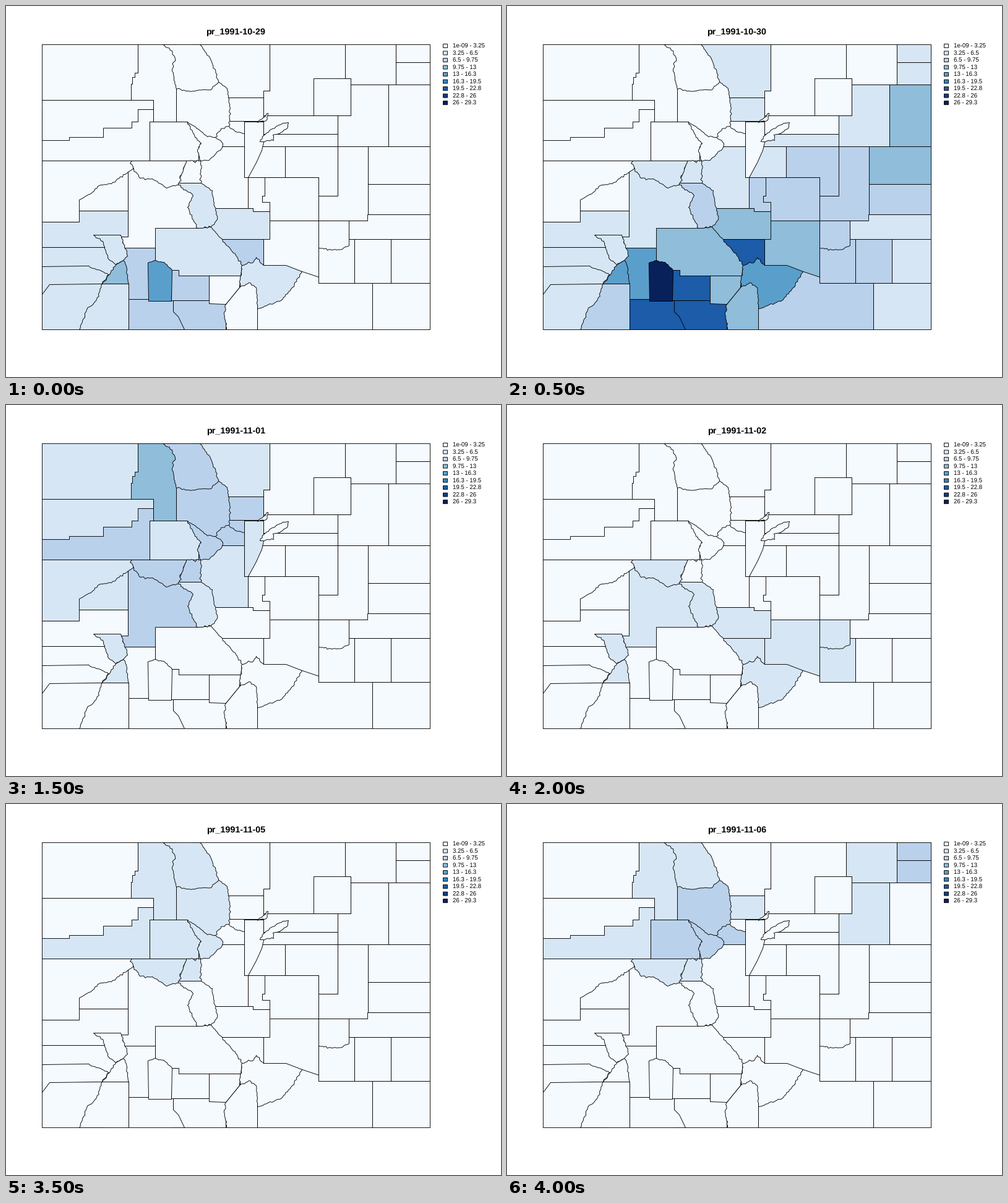
These frames come from a looping animation (800 px wide and 600 px high, 4.5 s). A matplotlib script:

```python
import numpy as np
import matplotlib.pyplot as plt
from matplotlib.animation import FuncAnimation
from matplotlib.collections import PolyCollection
from matplotlib.patches import Rectangle

W, H, DPI = 800, 600, 100
PX = 72 / DPI
LINE = 0.9 * PX
SHADES = ["#f5fafe", "#d6e6f4", "#bad1eb", "#8fbdda", "#5a9fcc",
          "#3585bf", "#1c5ca8", "#083f87", "#08215a"]
STEP = 3.25

rng = np.random.default_rng(11)
counties = {}  # painted in this order; later ones cover the hidden edges


def rough(pts):
    """Natural border: a line through pts with a small sideways wobble."""
    line = [pts[0]]
    for (x0, y0), (x1, y1) in zip(pts, pts[1:]):
        size = np.hypot(x1 - x0, y1 - y0)
        n = max(1, round(size / 3))
        for k in range(1, n):
            t, d = k / n, rng.normal(0, 0.8) / size
            line.append((x0 + (x1 - x0) * t - (y1 - y0) * d,
                         y0 + (y1 - y0) * t + (x1 - x0) * d))
        line.append((x1, y1))
    return line


def county(name, *parts):
    """Tuples are straight corners, lists are natural borders."""
    pts = []
    for part in parts:
        pts += rough(part) if isinstance(part, list) else [part]
    counties[name] = np.array(pts, float) + 0.5


def block(name, *corners):
    """Survey lines: go across, then down (or up), to each corner in turn."""
    pts = [corners[0]]
    for x, y in corners[1:] + corners[:1]:
        pts += [(x, pts[-1][1]), (x, y)]
    county(name, *pts)


# Plains
block("weld", (426, 62), (548, 177), (416, 137))
block("morgan", (497, 117), (557, 177))
block("logan", (548, 62), (630, 127), (557, 117))
block("sedgwick", (630, 62), (685, 91))
block("phillips", (630, 91), (685, 127))
block("washington", (557, 127), (618, 227), (536, 177))
block("yuma", (618, 127), (685, 227))
block("adams", (416, 177), (536, 207))
block("arapahoe", (414, 207), (536, 227))
block("douglas", (391, 227), (451, 277))
block("elbert", (451, 227), (536, 307), (505, 277))
block("lincoln", (536, 227), (585, 347), (505, 307))
block("kit_carson", (585, 227), (685, 288))
block("cheyenne", (585, 288), (685, 337))
block("kiowa", (584, 337), (685, 377), (554, 347))
block("el_paso", (414, 277), (505, 347))
block("teller", (391, 277), (418, 307), (414, 317), (426, 332), (399, 327))
block("otero", (505, 377), (563, 448))
county("crowley", (505, 347), (554, 347),
       [(554, 387), (543, 393), (525, 394), (505, 391)])
block("bent", (563, 377), (622, 448))
block("prowers", (622, 377), (685, 448))
block("baca", (592, 448), (685, 523))

# Northwest and the central mountains
block("moffat", (58, 62), (213, 152))
block("garfield", (58, 167), (238, 187), (232, 250))
block("rio_blanco", (58, 152), (238, 167), (213, 187), (203, 197), (157, 212),
      (102, 217))
block("routt", (213, 62), (213, 108), (208, 115), (204, 126), (202, 152),
      (238, 187), (275, 62))
block("eagle", (232, 187), (314, 250))
block("larimer", (300, 62), (426, 137), (416, 148))
block("boulder", (340, 148), (416, 186))
block("clear_creek", (338, 186), (385, 227))
county("gilpin", (350, 186), (385, 186), [(385, 206), (371, 203), (360, 194)])
block("park", (311, 227), (385, 277), (391, 327))
county("jefferson", (385, 187), (416, 187), (416, 220), (413, 233), (404, 253),
       (391, 277), (385, 277))
county("summit", (293, 187), (330, 205),
       [(338, 212), (350, 222), (349, 228), (339, 238), (328, 249), (314, 250),
        (309, 235), (315, 222), (305, 212), (293, 187)])
county("grand", (275, 125), [(343, 122), (357, 133), (362, 165), (360, 194),
                             (347, 198), (338, 212), (325, 211), (311, 199),
                             (293, 187)], (275, 187))
county("jackson", [(253, 62), (268, 72), (273, 85), (268, 102), (275, 134),
                   (293, 137), (331, 135), (343, 122), (329, 83), (313, 62)])

# South
block("fremont", (331, 327), (399, 332), (426, 377))
block("pueblo", (416, 377), (416, 347), (505, 438))
counties["fremont"] = counties.pop("fremont")
block("custer", (345, 377), (416, 421))
county("las_animas", (406, 523), (406, 480), (470, 428), (478, 429), (505, 438),
       (505, 448), (592, 448), (592, 523))

# Southwest
block("mesa", (58, 250), (205, 349))
county("delta", [(118, 313), (138, 302), (150, 290), (170, 287), (197, 268)],
       (197, 331), (118, 331))
block("montrose", (118, 331), (197, 390), (58, 349))
block("san_miguel", (58, 390), (177, 434))
block("montezuma", (58, 449), (160, 523))
county("dolores", (58, 421), [(130, 420), (152, 427), (165, 434), (155, 449)],
       (70, 450), (58, 466))
block("hinsdale", (188, 391), (241, 474), (198, 449))
county("la_plata", [(155, 449), (146, 474), (130, 491), (118, 523)],
       (198, 523), (198, 449))
county("san_juan", [(189, 411), (194, 420), (198, 449)], [(155, 449), (177, 418)])
county("gunnison", (197, 268), (205, 263), (278, 270), (310, 300), (310, 391),
       (191, 391), (186, 373), (197, 373))
county("ouray", (141, 370), (185, 370),
       [(186, 373), (196, 404), (189, 411), (177, 418), (164, 407), (156, 380),
        (141, 370)])
county("lake", [(291, 250), (314, 250), (315, 286)], (278, 286))
county("pitkin", [(291, 250), (284, 270), (278, 289), (259, 294), (236, 279),
                  (216, 278), (200, 254)], (203, 250))

# San Luis valley and its rims
block("conejos", (270, 476), (355, 523))
county("archuleta", (198, 474), (270, 474), (270, 494), (278, 502), (288, 523),
       (198, 523))
block("rio_grande", (267, 427), (328, 476))
county("alamosa", (328, 436), (379, 436), (377, 455), (355, 482), (328, 481))
county("costilla", [(355, 482), (352, 495), (356, 523)], (406, 523), (406, 440),
       (379, 440), (377, 455))
county("saguache", (241, 359), (309, 359), [(331, 357), (371, 403), (381, 419)],
       (379, 436), (279, 436), (279, 427), (241, 427))
county("mineral", [(229, 415), (241, 411), (255, 414), (268, 427)], (267, 477),
       (230, 477))
county("chaffee", (278, 286),
       [(315, 286), (333, 298), (335, 315), (341, 345), (331, 357), (309, 359),
        (293, 325), (302, 306), (278, 289)])
county("huerfano", [(381, 419), (400, 413), (404, 406), (416, 419)], (452, 419),
       [(478, 429), (462, 455), (444, 476), (406, 489), (404, 455), (392, 447),
        (377, 455), (381, 419)])

# Two small city counties
county("broomfield", [(406, 188), (423, 173), (420, 185), (406, 188)])
county("denver", [(416, 209), (428, 199), (447, 189), (456, 188), (455, 195),
                  (444, 204), (431, 208), (432, 217), (410, 219), (416, 209)])

# Daily rain: shade level -> counties; all others stay at level 0
days = [
    ("10-29", {1: "montrose san_miguel dolores montezuma la_plata ouray chaffee "
                  "fremont saguache huerfano",
               2: "hinsdale rio_grande archuleta conejos custer",
               3: "san_juan", 4: "mineral"}),
    ("10-30", {1: "larimer boulder arapahoe douglas washington sedgwick phillips "
                  "pitkin lake park gunnison montrose san_miguel ouray dolores "
                  "montezuma kiowa prowers baca",
               2: "elbert lincoln el_paso teller cheyenne crowley otero bent "
                  "las_animas la_plata chaffee",
               3: "yuma kit_carson fremont pueblo saguache alamosa costilla",
               4: "san_juan hinsdale huerfano",
               6: "custer rio_grande archuleta conejos", 8: "mineral"}),
    ("10-31", {1: "yuma kit_carson lincoln cheyenne kiowa pueblo crowley otero "
                  "bent custer huerfano las_animas",
               2: "prowers baca"}),
    ("11-01", {1: "moffat rio_blanco larimer eagle mesa delta jefferson park "
                  "chaffee ouray san_juan",
               2: "jackson grand boulder gilpin clear_creek summit garfield "
                  "pitkin lake gunnison",
               3: "routt"}),
    ("11-02", {1: "ouray san_juan gunnison pitkin chaffee fremont custer "
                  "huerfano pueblo otero crowley"}),
    ("11-03", {1: "pitkin"}),
    ("11-04", {}),
    ("11-05", {1: "routt garfield pitkin lake eagle summit grand jackson"}),
    ("11-06", {1: "routt jackson boulder garfield pitkin lake logan washington",
               2: "grand eagle summit clear_creek sedgwick phillips"}),
]

plt.rcParams.update({"font.family": "Liberation Sans", "text.hinting": "none"})
fig = plt.figure(figsize=(W / DPI, H / DPI), dpi=DPI, facecolor="white")
ax = fig.add_axes([0, 0, 1, 1])
ax.set_xlim(0, W)
ax.set_ylim(H, 0)
ax.axis("off")

state = PolyCollection(list(counties.values()), edgecolors="black",
                       linewidths=LINE, joinstyle="round", snap=False)
ax.add_collection(state)
title = ax.text(371.5, 46, "", size=14.4 * PX, weight="bold", ha="center",
                va="baseline")


def bound(k):
    return f"{STEP * k + 1e-9:.3g}"


for i, shade in enumerate(SHADES):
    y = 64.5 + 11.52 * i
    ax.add_patch(Rectangle((706.5, y - 3), 7, 6, fc=shade, ec="black", lw=LINE,
                           snap=False))
    ax.text(722, y + 3.6, f"{bound(i)} - {bound(i + 1)}", size=9.6 * PX,
            va="baseline")


def update(i):
    date, rain = days[i]
    level = {name: k for k, names in rain.items() for name in names.split()}
    state.set_facecolor([SHADES[level.get(name, 0)] for name in counties])
    title.set_text("pr_1991-" + date)
    return state, title


anim = FuncAnimation(fig, update, frames=len(days), interval=500, repeat=True,
                     repeat_delay=0)
plt.show()
```
